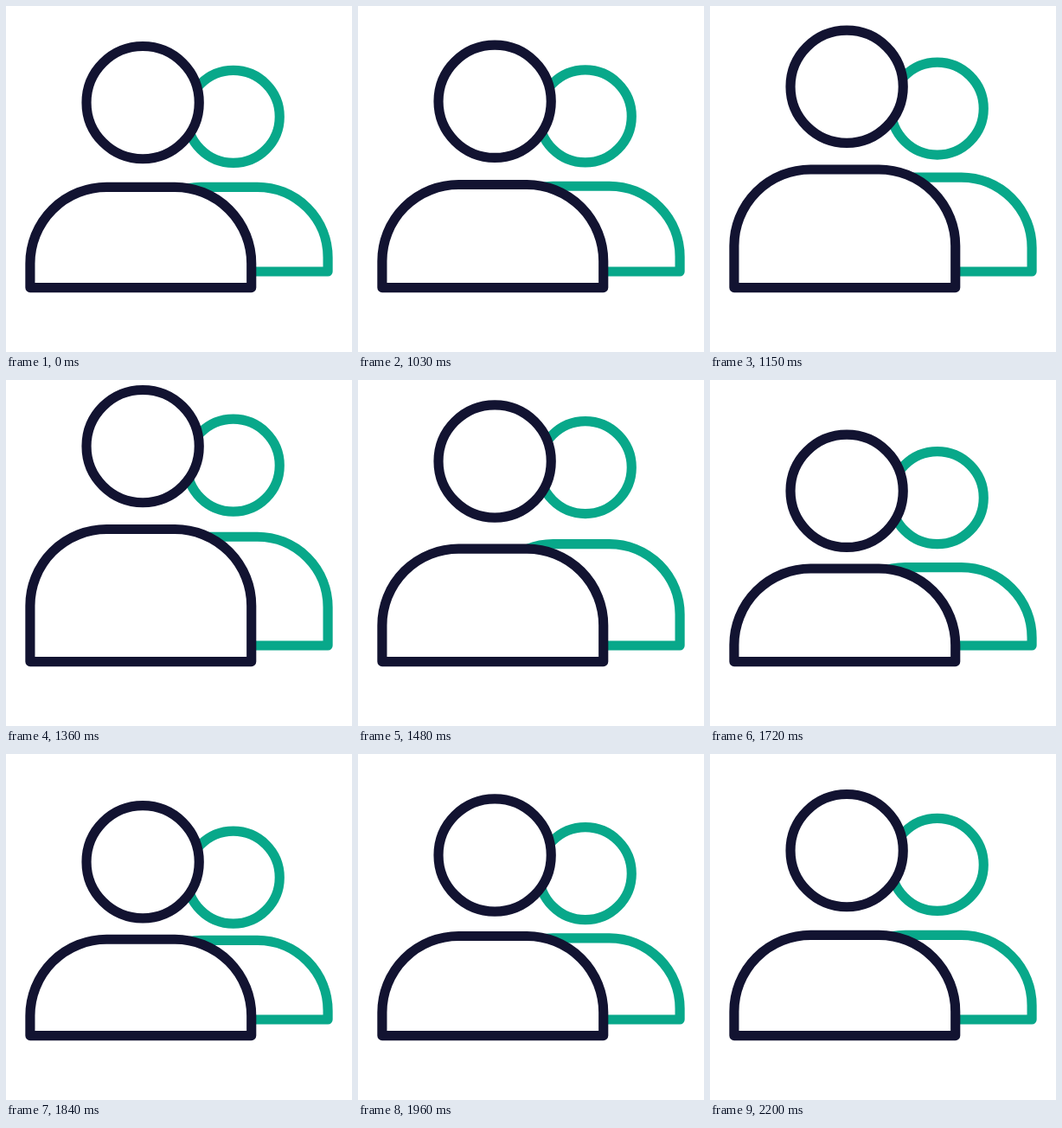
Recreate the animation shown at these times as an HTML page. Size 400 by 400 pixels, loop 2230 ms.

```html
<!DOCTYPE html>
<html>
<head>
<meta charset="utf-8">
<style>
  html, body { margin: 0; width: 100%; height: 100%; overflow: hidden; background: #fff; }
  svg { display: block; width: 100%; height: 100%; fill: #fff; stroke-width: 12; stroke-linejoin: round; }
</style>
</head>
<body>
<svg viewBox="0 0 430 430">
  <g stroke="#08a88a">
    <circle id="backHead" cx="282.5" cy="137.5" r="57.5"/>
    <path id="backBody"/>
  </g>
  <g stroke="#121331">
    <circle id="frontHead" cx="170" cy="120" r="70"/>
    <path id="frontBody"/>
  </g>
</svg>
<script>
const LOOP = 2230, START = 1000, SHOULDER = 225;
const $ = id => document.getElementById(id);
const clamp = u => Math.min(1, Math.max(0, u));
const smooth = u => u * u * (3 - 2 * u);

// Rise to a peak, fall to a dip below rest, then settle; kick is the slope at takeoff.
function hop(t, { peakAt, rise, dipAt, dip, end, kick = 0 }) {
  const u = clamp((t - START) / (peakAt - START));
  const up = smooth(u) + kick * u * (1 - u) ** 2;
  const down = smooth(clamp((t - peakAt) / (dipAt - peakAt)));
  const settle = smooth(clamp((t - dipAt) / (end - dipAt)));
  return -rise * up + (rise + dip) * down - dip * settle;
}

const bodyPath = (left, right, top, bottom, r) =>
  `M${left} ${bottom}V${top + r}A${r} ${r} 0 0 1 ${left + r} ${top}` +
  `H${right - r}A${r} ${r} 0 0 1 ${right} ${top + r}V${bottom}Z`;

function draw() {
  const t = performance.now() % LOOP;
  const frontHead = hop(t, { peakAt: 1310, rise: 40, dipAt: 1730, dip: 18, end: 2100, kick: 0.1 });
  const frontBody = hop(t, { peakAt: 1325, rise: 41.5, dipAt: 1635, dip: 10.5, end: 2050, kick: 0.6 });
  const backHead = hop(t, { peakAt: 1410, rise: 32.7, dipAt: 1820, dip: 16, end: 2200 });
  const backBody = hop(t, { peakAt: 1370, rise: 30.2, dipAt: 1720, dip: 7.8, end: 2200, kick: 0.25 });

  $('frontHead').setAttribute('transform', `translate(0 ${frontHead})`);
  $('backHead').setAttribute('transform', `translate(0 ${backHead})`);
  $('frontBody').setAttribute('d', bodyPath(30, 305, SHOULDER + frontBody, 350, 95));
  $('backBody').setAttribute('d', bodyPath(155, 400, SHOULDER + backBody, 330, 87.5));
  requestAnimationFrame(draw);
}
draw();
</script>
</body>
</html>
```
